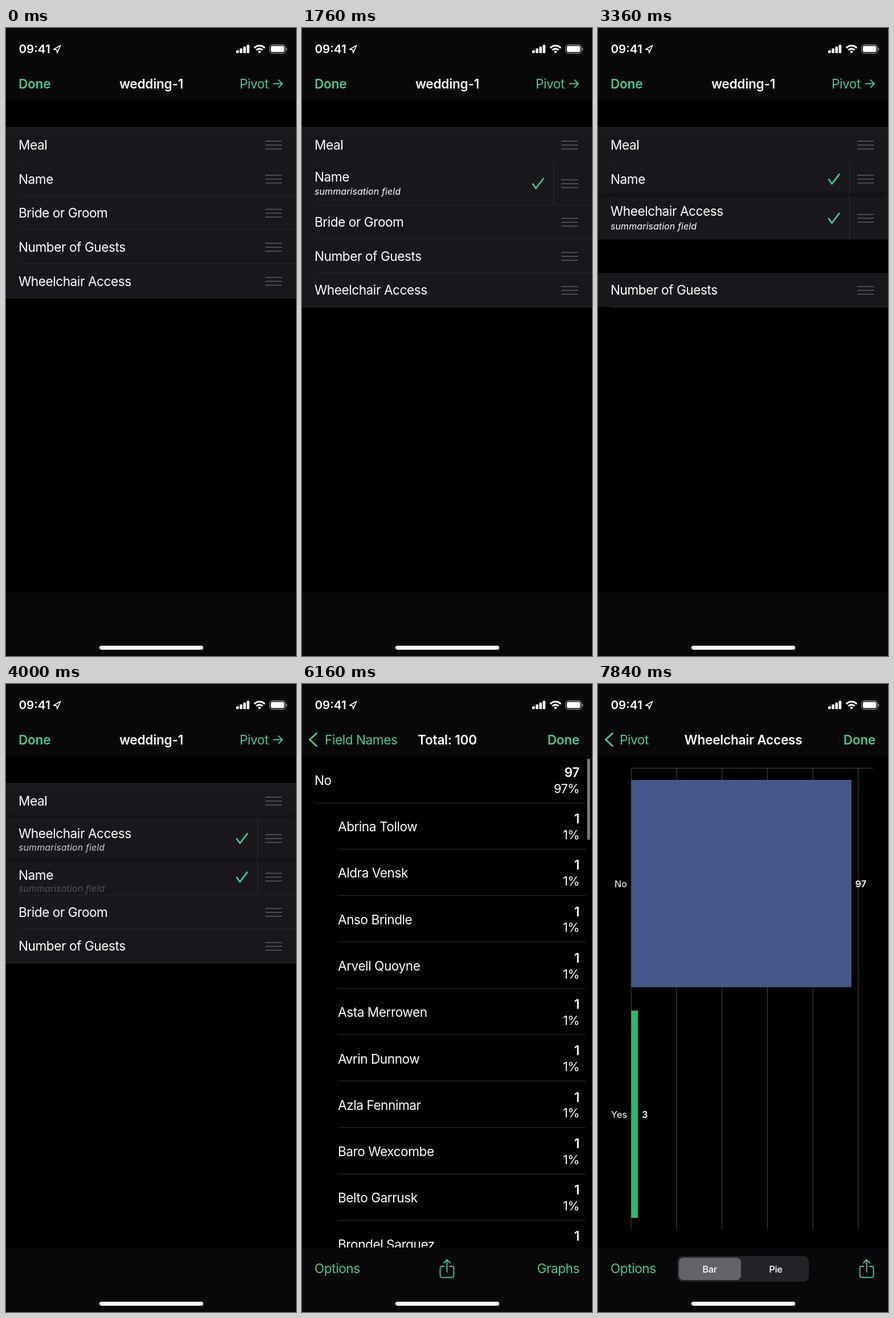
An HTML page with a canvas for the animation above (8000 ms loop, 509 by 1100 pixels).

```html
<!DOCTYPE html>
<html lang="en">
<head>
<meta charset="utf-8">
<title>Pivot table demo</title>
<style>
html, body { margin: 0; width: 100%; height: 100%; overflow: hidden; background: #000; }
canvas { display: block; }
</style>
</head>
<body>
<canvas id="stage" width="509" height="1100"></canvas>
<script>
const ctx = document.getElementById('stage').getContext('2d');
const W = 509, LOOP = 8000, STEP = 80;
const GREEN = '#47c890', BAR = '#080709', ROW = '#19171b', LINE = '#343337';
const LIST_TOP = 174.5, ROW_H = 59.65, EXTRA_H = 15.95;
const GUESTS = ['Abrina Tollow', 'Aldra Vensk', 'Anso Brindle', 'Arvell Quoyne', 'Asta Merrowen',
  'Avrin Dunnow', 'Azla Fennimar', 'Baro Wexcombe', 'Belto Garrusk', 'Brondel Sarquez'];

const clamp = v => Math.min(1, Math.max(0, v));
const mix = (a, b, p) => a + (b - a) * p;
const ramp = (t, start, length) => clamp((t - start) / length);
const ease = (t, start, length) => (1 - Math.cos(Math.PI * ramp(t, start, length))) / 2;

// Critically damped spring used by page pushes
function push(t, start) {
  const x = Math.max(0, t - start) * 0.0127;
  return x > 7 ? 1 : 1 - (1 + x) * Math.exp(-x);
}

function layer(x, alpha, draw) {
  if (alpha <= 0) return;
  ctx.save();
  ctx.translate(x, 0);
  ctx.globalAlpha *= alpha;
  draw();
  ctx.restore();
}

function rect(x, y, w, h, color, radius = 0) {
  ctx.fillStyle = color;
  ctx.beginPath();
  ctx.roundRect(x, y, w, h, radius);
  ctx.fill();
}

function text(str, x, middle, { size = 22.6, weight = 400, color = '#fff', align = 'left', style = '',
  spacing = weight > 500 ? -0.01 : -0.0195 } = {}) {
  ctx.font = `${style} ${weight} ${size}px Inter, sans-serif`;
  ctx.letterSpacing = spacing * size + 'px';
  ctx.textAlign = align;
  ctx.fillStyle = color;
  ctx.fillText(str, x, middle + size * 0.364);
}

function stroke(path, color, width, x = 0, y = 0) {
  ctx.save();
  ctx.translate(x, y);
  ctx.strokeStyle = color;
  ctx.lineWidth = width;
  ctx.lineCap = ctx.lineJoin = 'round';
  ctx.stroke(new Path2D(path));
  ctx.restore();
}

const link = (str, x, y, align = 'left', weight = 400) => text(str, x, y, { color: GREEN, align, weight });
const title = (str, x) => text(str, x, 97.5, { weight: 600, align: 'center' });

function shareIcon(x) {
  stroke('M-5 -5H-8.5Q-12 -5 -12 -1.5V11Q-12 14.5 -8.5 14.5H8.5Q12 14.5 12 11V-1.5Q12 -5 8.5 -5H5M0 5V-16M-5.5 -11L0 -16.5L5.5 -11', GREEN, 1.9, x, 1025);
}

function statusBar() {
  text('09:41', 22.5, 37, { size: 20.6, weight: 600, spacing: 0 });
  stroke('M83.5 37.5L95.5 30.5L90 43.5L88.8 38.2Z', '#fff', 1.7);
  for (let i = 0; i < 4; i++) {
    const h = 5 + i * 3.2;
    rect(404 + i * 6.2, 44 - h, 4.6, h, '#fff', 1.3);
  }
  ctx.lineCap = 'butt';
  ctx.strokeStyle = '#fff';
  ctx.lineWidth = 3.2;
  for (const r of [7.6, 13]) {
    ctx.beginPath();
    ctx.arc(445, 44, r, -Math.PI * 0.75, -Math.PI * 0.25);
    ctx.stroke();
  }
  ctx.fillStyle = '#fff';
  ctx.beginPath();
  ctx.moveTo(445, 44.5);
  ctx.arc(445, 44, 4, -Math.PI * 0.75, -Math.PI * 0.25);
  ctx.fill();
  ctx.strokeStyle = '#8a898c';
  ctx.lineWidth = 1.3;
  ctx.beginPath();
  ctx.roundRect(463, 29.5, 27.5, 14.5, 4.5);
  ctx.stroke();
  rect(465, 31.5, 23.5, 10.5, '#fff', 2.5);
  rect(491.5, 34.5, 1.8, 5, '#8a898c', 1);
}

function fieldRow({ name, y, sum = 0, picked = 0, lift = 0, last }) {
  const h = ROW_H + EXTRA_H * sum, mid = y + h / 2 + 0.6;
  rect(0, y, W, h, ROW);
  layer(0, 1 - lift, () => rect(last ? 0 : 22, y + h - 0.5, W, 1, LINE));
  text(name, 22, y + mix(30.2, 26.5, sum));
  layer(0, sum, () => text('summarisation field', 22, y + 52.3, { size: 16, style: 'italic', spacing: 0.005 }));
  layer(0, picked, () => {
    rect(441, y, 1, h, LINE);
    stroke('M-9 0.5L-3.5 8.5L9.5 -8.5', GREEN, 2.7, 414, mid);
  });
  for (const dy of [-6.8, 0, 6.8]) rect(455, mid + dy - 0.6, 29.5, 1.5, '#5d5c60');
}

function fieldsPage(t) {
  const nameIn = ease(t, 840, 360), accessIn = ease(t, 1960, 360), swap = ease(t, 3880, 360);
  const drag = Math.sin(ramp(t, 2992, 800) * Math.PI / 2);
  const lift = ramp(t, 2660, 140) * (1 - swap);
  const access = { name: 'Wheelchair Access', sum: accessIn - swap, picked: accessIn, lift };
  const accessH = ROW_H + EXTRA_H * access.sum;
  const rows = [
    { name: 'Meal', shift: 0 },
    { name: 'Name', sum: nameIn - accessIn + swap, picked: nameIn, shift: ease(t, 3540, 260) },
    { name: 'Bride or Groom', shift: ease(t, 3380, 260) },
    { name: 'Number of Guests', shift: ease(t, 3060, 260), last: t >= 3920 },
  ];
  let y = LIST_TOP;
  for (const row of rows) {
    fieldRow({ ...row, y: y + row.shift * accessH });
    y += ROW_H + EXTRA_H * (row.sum || 0);
  }
  rect(0, LIST_TOP - 0.5, W, 1, LINE);
  access.y = mix(y, LIST_TOP + ROW_H, drag);
  access.last = drag === 0;
  if (lift > 0) {
    ctx.save();
    ctx.shadowColor = `rgba(0,0,0,${lift})`;
    ctx.shadowBlur = 8;
    rect(0, access.y, W, accessH, ROW);
    ctx.restore();
  }
  fieldRow(access);
}

function pivotPage(t) {
  rect(0, 127, W, 860, '#000');
  ['No', ...GUESTS].forEach((name, i) => {
    const y = 127 + i * 81.27, x = i ? 63 : 22, count = i ? '1' : '97';
    text(name, x, y + 41.7);
    text(count, 487, y + 27.5, { weight: 600, align: 'right' });
    text(count + '%', 487, y + 55.7, { size: 21.5, align: 'right' });
    rect(x, y + 80.5, 497.5 - x, 1, LINE);
  });
  layer(0, ramp(t, 5840, 160), () => rect(500.5, 131, 5, 142, '#7d7c80', 2.5));
}

function chartPage(t) {
  const grow = ease(t, 7060, 770), unit = 79.7 / 20;
  rect(0, 127, W, 860, '#000');
  for (let i = 0; i < 6; i++) rect(57.8 + i * 79.7, 147, 1, 808, '#4d4c4e');
  rect(58, 147, 425, 1, '#4d4c4e');
  [['No', 97, 168, '#45578b'], ['Yes', 3, 572, '#32b66d']].forEach(([label, value, y, color]) => {
    const w = value * unit * grow, mid = y + 182;
    rect(58.3, y, w, 363, color);
    text(label, 51, mid, { size: 16.3, align: 'right', spacing: 0 });
    text(String(value), 58 + w + 7, mid, { size: 16.3, weight: 600, spacing: 0 });
  });
}

function backLink(str, x, slide) {
  stroke('M25.5 86.5L13.5 97.5L25.5 108.5', GREEN, 3);
  layer(slide, 1, () => link(str, x, 97.5));
}

const incomingTitle = (str, p, offset = 0) =>
  layer(0, p, () => title(str, 255 + 234 * (1 - p) + offset));

function fieldsBars(p) {
  link('Done', 22, 97.5, 'left', 600);
  link('Pivot', 410, 97.5);
  stroke('M469.5 97.5H485M478.5 91L485 97.5L478.5 104', GREEN, 2);
  title('wedding-1', 255 - 108 * p);
}

function pivotBars(p, q) {
  backLink('Field Names', 40, 163 * (1 - p));
  incomingTitle('Total: 100', p, -108 * q);
  link('Done', 487, 97.5, 'right', 600);
  link('Options', 22, 1024);
  shareIcon(254.5);
  link('Graphs', 487, 1024, 'right');
}

function chartBars(q) {
  backLink('Pivot', 38, 163 * (1 - q));
  incomingTitle('Wheelchair Access', q);
  link('Done', 487, 97.5, 'right', 600);
  link('Options', 22, 1024);
  rect(139, 1002, 231, 45, '#242327', 9);
  rect(142, 1005, 109, 39, '#656369', 8);
  text('Bar', 196, 1024.5, { size: 16.5, weight: 500, align: 'center' });
  text('Pie', 312, 1024.5, { size: 16.5, weight: 500, align: 'center' });
  shareIcon(471.5);
}

function draw(t) {
  const p = push(t, 5234), q = push(t, 6674);
  rect(0, 0, W, 1100, '#000');
  if (p < 1) layer(-153 * p, 1, () => fieldsPage(t));
  if (p > 0 && q < 1) layer(W * (1 - p) - 153 * q, 1, () => pivotPage(t));
  if (q > 0) layer(W * (1 - q), 1, () => chartPage(t));
  rect(0, 0, W, 127, BAR);
  rect(0, 987, W, 113, BAR);
  layer(0, 1 - p, () => fieldsBars(p));
  layer(0, p * (1 - q), () => pivotBars(p, q));
  layer(0, q, () => chartBars(q));
  statusBar();
  rect(164, 1082, 182, 7, '#fff', 3.5);
}

function tick() {
  draw(Math.floor(performance.now() % LOOP / STEP) * STEP);
  requestAnimationFrame(tick);
}
tick();
</script>
</body>
</html>
```
